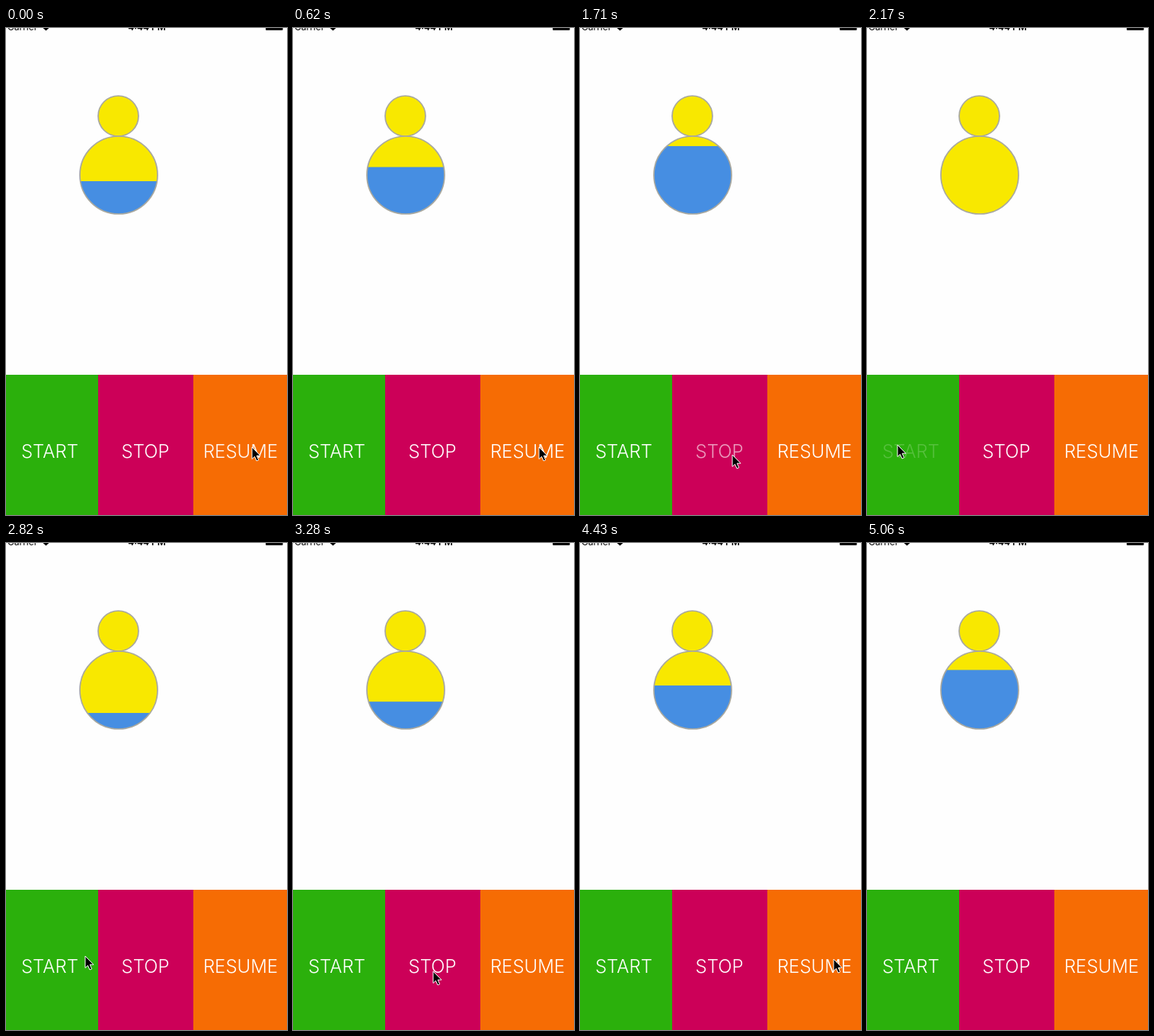
These frames come from a looping animation (369x639 px, 5.23 s). An HTML page:

```html
<!DOCTYPE html>
<html lang="en">
<head>
<meta charset="utf-8">
<title>Filling figure</title>
<style>
  html, body { margin: 0; width: 100%; height: 100%; overflow: hidden; background: #fefefe; }
  svg { display: block; width: 369px; height: 639px; }
  text { font-family: Inter, Roboto, sans-serif; }
  .label { font-size: 24px; font-weight: 300; fill: #fff; text-anchor: middle; }
  .status { font-size: 12px; }
  .outline { stroke: #a8a8a0; stroke-width: 1.7; }
</style>
</head>
<body>
<svg viewBox="0 0 369 639">
  <clipPath id="body"><circle cx="148" cy="193" r="51"/></clipPath>

  <text class="status" x="2" y="3">Carrier</text>
  <path d="M48.5 0h8L52.500 3.500z"/>
  <text class="status" x="185" y="3" text-anchor="middle" font-weight="600">4:44 PM</text>
  <rect x="341" y="-6" width="22.500" height="9" rx="1"/>

  <circle class="outline" cx="147.500" cy="115.500" r="26.500" fill="#f8e800"/>
  <circle cx="148" cy="193" r="51" fill="#f8e800"/>
  <rect id="water" x="96" width="104" height="110" fill="#468ee2" clip-path="url(#body)"/>
  <circle class="outline" cx="148" cy="193" r="51" fill="none"/>

  <rect y="455" width="121" height="184" fill="#2bb00c"/>
  <rect x="121" y="455" width="125" height="184" fill="#cc0058"/>
  <rect x="246" y="455" width="123" height="184" fill="#f66c04"/>
  <text class="label" id="start" x="57.500" y="564">START</text>
  <text class="label" id="stop" x="183" y="564">STOP</text>
  <text class="label" id="resume" x="308" y="564">RESUME</text>

  <path id="cursor" d="M0 0V15.500L3.500 12.300L6 18L8.700 16.800L6.200 11.200H11z" stroke="#fff" stroke-width="1"/>
</svg>
<script>
const LOOP = 5230, STEP = 57.5, LAST = 5060;
const SPEED = 0.0322, FADE = 470, DIM = 0.2;
const byId = id => document.getElementById(id);
const clamp = v => Math.max(0, Math.min(1, v));
const smooth = v => v * v * (3 - 2 * v);

// [time pressed, time released]
const presses = {
  start: [[2060, 2140]],
  stop: [[1350, 1430], [3360, 3440]],
  resume: [[-500, -400], [3850, 3930]]
};

// [time, x, y] of the pointer tip
const route = [
  [0, 323, 550], [850, 323, 550], [1150, 200, 556], [1350, 200, 560],
  [1700, 200, 560], [2060, 40, 547], [2500, 40, 547], [2820, 104, 542],
  [3200, 184, 562], [3480, 184, 562], [3780, 333, 546], [4560, 333, 546],
  [5000, 333, 645]
];

function waterTop(t) {
  if (t < 2120) return 201 - Math.min(t, 1430) * SPEED;
  const paused = Math.max(0, Math.min(t, 3930) - 3440);
  return 244 - Math.max(0, t - paused - 2165) * SPEED;
}

function labelOpacity(list, t) {
  return list.reduce((alpha, [down, up]) =>
    t < down ? alpha : DIM + (1 - DIM) * smooth(clamp((t - up) / FADE)), 1);
}

function pointer(t) {
  const next = route.findIndex(([time]) => time > t);
  if (next < 0) return route[route.length - 1].slice(1);
  const [t0, x0, y0] = route[next - 1], [t1, x1, y1] = route[next];
  const k = smooth((t - t0) / (t1 - t0));
  return [x0 + (x1 - x0) * k, y0 + (y1 - y0) * k];
}

function draw(now) {
  const t = Math.min(LAST, Math.floor((now % LOOP) / STEP) * STEP);
  byId("water").setAttribute("y", waterTop(t));
  for (const id in presses) byId(id).setAttribute("opacity", labelOpacity(presses[id], t));
  byId("cursor").setAttribute("transform", `translate(${pointer(t)})`);
}

const begin = performance.now();
function tick() {
  draw(performance.now() - begin);
  requestAnimationFrame(tick);
}
tick();
</script>
</body>
</html>
```
